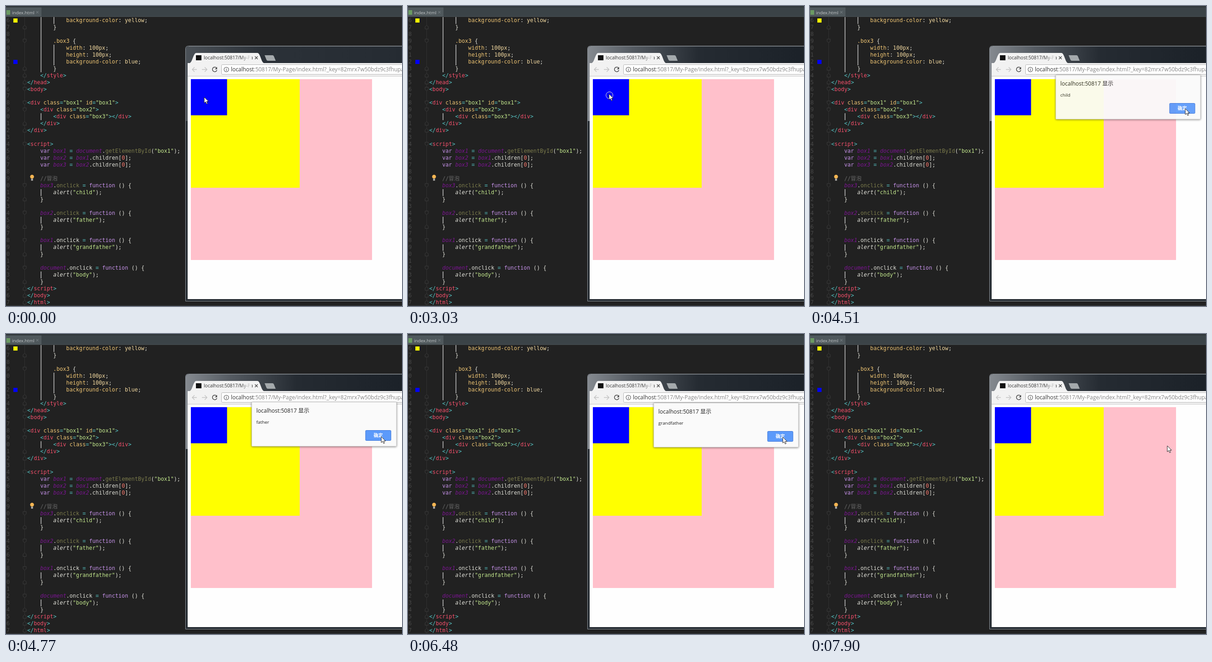
An HTML page for the animation above (7990 ms loop, 859 by 652 pixels).

```html
<!DOCTYPE html>
<html>
<head>
<meta charset="utf-8">
<style>
html, body { margin: 0; width: 100%; height: 100%; overflow: hidden; background: #212121; }
svg { display: block; }
text { white-space: pre; font-family: "Open Sans", "Noto Sans CJK SC", "Noto Sans CJK", sans-serif; }
#code text { font: 11.74px "DejaVu Sans Mono", "Noto Sans CJK SC", monospace; fill: #e0e0d8; }
#code .number { fill: #484848; }
.bracket { fill: #58c6c6; }
.tag { fill: #f4516c; }
.attr, .prop, .selector { fill: #f0c674; }
.string { fill: #c3e88d; }
.keyword { fill: #c792ea; }
.global { fill: #7a1590; font-style: italic; }
.call { font-style: italic; }
.olive { fill: #7a7a4b; }
.index { fill: #f7776c; }
.value { fill: #f3d9a0; }
.note { fill: #686868; }
#dialog { filter: drop-shadow(0 1px 2px #0007); }
</style>
</head>
<body>
<svg width="859" height="652" viewBox="0 0 859 652">
  <defs>
    <linearGradient id="idle"><stop stop-color="#4b5157"/><stop offset=".35" stop-color="#2b3138"/><stop offset="1" stop-color="#252b32"/></linearGradient>
    <linearGradient id="active"><stop stop-color="#858a90"/><stop offset=".2" stop-color="#555b62"/><stop offset=".5" stop-color="#252b32"/><stop offset="1" stop-color="#1b2128"/></linearGradient>
    <linearGradient id="fade"><stop stop-color="#f2f2f2" stop-opacity="0"/><stop offset="1" stop-color="#f2f2f2"/></linearGradient>
  </defs>

  <!-- editor -->
  <rect width="859" height="652" fill="#212121"/>
  <rect width="859" height="23" fill="#3b4347"/>
  <rect width="859" height="3" fill="#30373a"/>
  <rect y="3" width="77" height="20" fill="#4f585c"/>
  <rect y="22.5" width="859" height="1" fill="#50595c"/>
  <rect x="1" y="9" width="8" height="10" fill="#6a9a63"/>
  <text x="13" y="17.5" font-size="9.8" fill="#c4c8ca">index.html</text>
  <path d="M65.5 11l5 5m0-5l-5 5" stroke="#7f888b"/>
  <path d="M40.5 24V652" stroke="#303030"/>
  <g id="code"></g>
  <path d="M76 24V144M104 24V39M104 84V129M76 233V248M76 398V413M76 458V473M76 518V532M76 577V592" stroke="#e8e8e8" stroke-width="1.2"/>
  <rect x="16" y="27" width="9" height="9" fill="#ff0"/>
  <rect x="16" y="117" width="9" height="9" fill="#00f"/>
  <circle cx="56.5" cy="371" r="4.2" fill="#f5b552"/>
  <rect x="54.5" y="375.5" width="4" height="4" fill="#b8b8b8"/>
  <rect y="650.5" width="859" height="1.5" fill="#303436"/>

  <!-- browser window -->
  <path d="M389.5 641.5V93q0-6 6-6H870V641.5z" fill="#252b31" stroke="#8b9197"/>
  <path id="title" d="M390 124V93.500q0-6 6-6H870V124z"/>
  <rect id="edge" x="390" y="122" width="4" height="128"/>
  <path d="M396 87.500H859" stroke="#8b9197"/>
  <path d="M398 124.500C405 122 406 102 413 102H545C552 102 553 122 560 124.500z" fill="#f2f2f2"/>
  <path d="M561 107H578q2 0 3 2l4 10H568q-2 0-3-2z" fill="#a4a9ac"/>
  <rect x="412" y="107" width="12" height="11" fill="#111"/>
  <text x="429" y="116" font-size="10.1" fill="#333">localhost:50817/My-Pa</text>
  <rect x="508" y="104" width="25" height="16" fill="url(#fade)"/>
  <path d="M540 109.500l6 6m0-6l-6 6" stroke="#444" stroke-width="1.3"/>
  <rect x="394" y="124" width="465" height="29" fill="#f2f2f2"/>
  <path d="M394 152.500H859" stroke="#c4c4c4"/>
  <g fill="none" stroke="#c3c3c3" stroke-width="1.4">
    <path d="M414 138H404m5-5l-5 5 5 5M425 138H436m-5-5l5 5-5 5"/>
    <path d="M456.600 134.500A5 5 0 1 0 457.500 139.500" stroke="#4a4a4a" stroke-width="1.600"/>
    <path d="M458 132.500v5h-5z" fill="#4a4a4a" stroke="none"/>
  </g>
  <rect x="467.500" y="127.500" width="400" height="21" rx="2" fill="#fff" stroke="#b5b5b5"/>
  <circle cx="478" cy="138" r="5" fill="none" stroke="#555" stroke-width="1.1"/>
  <path d="M478 137v4m0-6.500v1.300" stroke="#555" stroke-width="1.2"/>
  <text x="488" y="142" font-size="11.9" fill="#333">localhost<tspan fill="#858585">:50817/My-Page/index.html?_key=82mrx7w50bdz9c3fhupa6n471e</tspan></text>
  <rect x="394" y="153" width="465" height="484" fill="#fefefe"/>
  <rect x="401" y="159" width="393" height="393" fill="#ffc0cb"/>
  <rect x="401" y="159" width="236" height="236" fill="#ff0"/>
  <rect x="401" y="159" width="78.500" height="78.500" fill="#00f"/>

  <g id="dialog">
    <rect x="533" y="150" width="314" height="96" rx="1.500" fill="#fafafa" stroke="#bdbdbd" stroke-width=".8"/>
    <text x="543" y="172.500" font-size="12" fill="#222">localhost:50817 显示</text>
    <text id="message" x="543" y="196.500" font-size="9.800" fill="#222"></text>
    <rect x="780" y="211.500" width="55" height="22" rx="1.500" fill="#5c9afa" stroke="#3b74d8"/>
    <text x="807.500" y="226.300" font-size="10" font-weight="bold" text-anchor="middle" fill="#fff">确定</text>
  </g>
  <circle id="ring" cx="437" cy="194" r="7.500" fill="none" stroke="#e8e8c8"/>
  <path id="cursor" d="M0 0V13L3 10.200 5.200 15 7.300 14 5.200 9.500H9.300z" fill="#fff" stroke="#111" stroke-width=".9"/>
</svg>
<script>
const LOOP = 7990, FIRST_LINE = 16, PITCH = 14.95;
const $ = id => document.getElementById(id);

const source = `            background-color: yellow;
        }

        .box3 {
            width: 100px;
            height: 100px;
            background-color: blue;
        }
    </style>
</head>
<body>

<div class="box1" id="box1">
    <div class="box2">
        <div class="box3"></div>
    </div>
</div>

<script>
    var box1 = document.getElementById("box1");
    var box2 = box1.children[0];
    var box3 = box2.children[0];

    //冒泡
    box3.onclick = function () {
        alert("child");
    }

    box2.onclick = function () {
        alert("father");
    }

    box1.onclick = function () {
        alert("grandfather");
    }

    document.onclick = function () {
        alert("body");
    }
<\/script>
</body>
</html>`;

const syntax = new RegExp([
  '(?<note>//.*)', '(?<string>"[^"]*")', '(?<tag>(?<=</?)\\w+)', '(?<bracket></?|>|=)',
  '(?<attr>\\w+(?==))', '(?<keyword>\\b(?:var|function)\\b)', '(?<selector>\\.box\\d)',
  '(?<global>\\b(?:box\\d|document)\\b)', '(?<call>alert)',
  '(?<olive>getElementById|(?<=box[23]\\.)onclick)', '(?<index>\\d(?=\\]))',
  '(?<prop>[\\w-]+(?=:))', '(?<value>\\d+px|yellow|blue)'
].join('|'), 'g');

function add(parent, name, attrs, text = '') {
  const node = document.createElementNS('http://www.w3.org/2000/svg', name);
  for (const key in attrs) node.setAttribute(key, attrs[key]);
  node.textContent = text;
  return parent.appendChild(node);
}

source.split('\n').forEach((line, i) => {
  const y = 31 + i * PITCH, code = $('code');
  add(code, 'text', { x: 8, y: y + 4, 'text-anchor': 'end', class: 'number' }, FIRST_LINE + i);
  if (/[{}]$|^ *<.*>$/.test(line) && !line.includes('></')) {
    const flip = /}|<\//.test(line) ? -1 : 1;
    add(code, 'path', { d: 'M-3.5-4h7v5l-3.5 3-3.5-3z', fill: '#212121', stroke: '#3c3c3c',
      transform: `translate(40.5 ${y}) scale(1 ${flip})` });
  }
  const body = line.trimStart(), indent = line.length - body.length;
  const row = add(code, 'text', { x: 46 + indent * 7.05, y: y + 4 });
  let end = 0;
  for (const match of body.matchAll(syntax)) {
    const kind = Object.keys(match.groups).find(key => match.groups[key]);
    add(row, 'tspan', {}, body.slice(end, match.index));
    add(row, 'tspan', { class: kind }, match[0]);
    end = match.index + match[0].length;
  }
  add(row, 'tspan', {}, body.slice(end));
});

// Pointer moves: first step, last step, step count, waypoints
const moves = [
  [650, 1430, 11, [[430, 198], [428, 190], [443, 189], [443, 203], [433, 202]]],
  [1490, 1970, 8, [[433, 202], [431, 197], [439, 192], [436, 191]]],
  [3690, 3690, 1, [[436, 191], [444, 195]]],
  [3750, 4450, 11, [[444, 195], [814, 223]]],
  [5170, 5170, 1, [[814, 223], [813, 223]]],
  [6480, 6480, 1, [[813, 223], [813, 224]]],
  [7810, 7900, 2, [[813, 224], [775, 243]]]
];
// Alerts: text, opening time, closing time
const alerts = [['child', 3160, 4500], ['father', 4660, 5870], ['grandfather', 6040, 6650], ['body', 6760, 7410]];
const clamp = v => Math.max(0, Math.min(1, v));

function pointerAt(t) {
  const [start, end, count, points] = moves.findLast(m => t >= m[0]) || moves[0];
  const step = t < start ? 0 : count === 1 ? 1 :
    Math.min(count, Math.floor((t - start) / (end - start) * (count - 1) + 1.01));
  const p = step / count, along = p * p * (3 - 2 * p) * (points.length - 1);
  const i = Math.min(points.length - 2, Math.floor(along));
  return points[i].map((v, axis) => Math.round(v + (points[i + 1][axis] - v) * (along - i)));
}

function draw(now) {
  const t = now % LOOP;
  const focus = t >= 3030;
  $('title').setAttribute('fill', focus ? 'url(#active)' : 'url(#idle)');
  $('edge').setAttribute('fill', focus ? '#858a90' : '#4b5157');
  $('ring').style.display = focus && t < 3190 ? '' : 'none';
  $('cursor').setAttribute('transform', `translate(${pointerAt(t)})`);

  const shown = alerts.findLast(a => t >= a[1]);
  $('dialog').style.display = shown ? '' : 'none';
  if (shown) {
    const [text, open, close] = shown;
    const enter = clamp((t - open) / 200), leave = clamp((t - close) / 170);
    $('message').textContent = text;
    $('dialog').style.opacity = clamp(enter * 1.8) * (1 - leave);
    $('dialog').setAttribute('transform', `translate(0 ${Math.round(-12 * (1 - enter) ** 2 - 8 * leave ** 2)})`);
  }
  requestAnimationFrame(draw);
}
requestAnimationFrame(draw);
</script>
</body>
</html>
```
